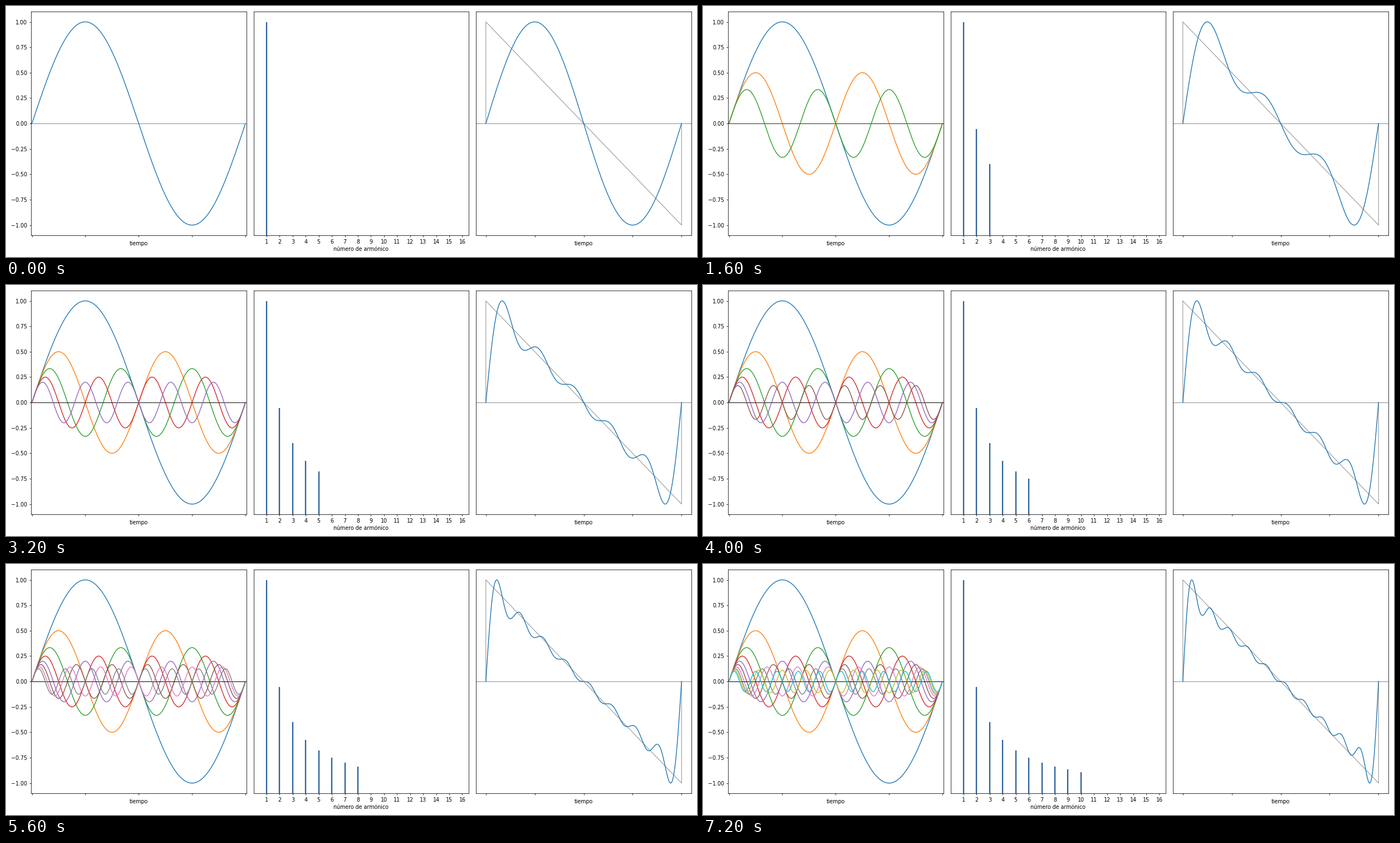
A matplotlib script that plays this animation: 1241 by 451 pixels, repeating every 8000 ms.

```python
import numpy as np
import matplotlib.pyplot as plt
from matplotlib.animation import FuncAnimation

W, H, DPI = 1241, 451, 72      # at 72 dpi one point is one pixel
STEPS, STEP_MS = 10, 800
TOP, AX_W, AX_H = 10.25, 386.6, 401.7
LEFTS = (45.0, 444.6, 844.2)
GUIDE = dict(color="black", alpha=0.45, lw=1)

plt.rcParams.update({
    "font.family": "DejaVu Sans",
    "font.size": 9.5,
    "axes.labelpad": 3.8,
    "axes.linewidth": 0.8,
    "lines.linewidth": 1.4,
    "xtick.major.size": 3.3, "xtick.major.pad": 3.3,
    "ytick.major.size": 3.3, "ytick.major.pad": 3.3,
})

fig = plt.figure(figsize=(W / DPI, H / DPI), dpi=DPI, facecolor="white")


def panel(left, xlim, ylim, xlabel):
    ax = fig.add_axes([left / W, 1 - (TOP + AX_H) / H, AX_W / W, AX_H / H])
    ax.set(xlim=xlim, ylim=ylim, xlabel=xlabel)
    return ax


def time_panel(left, margin):
    ax = panel(left, (-margin, 1 + margin), (-1.1, 1.1), "tiempo")
    ax.set_xticks(np.linspace(0, 1, 5), labels=[])
    return ax


ax_parts = time_panel(LEFTS[0], 0.004)
ax_spec = panel(LEFTS[1], (0, 16.5), (0, 1.05), "número de armónico")
ax_sum = time_panel(LEFTS[2], 0.05)

ax_parts.set_yticks(np.linspace(-1, 1, 9))
ax_spec.set_xticks(range(1, 17))
ax_spec.set_yticks([])
ax_sum.set_yticks([])

t = np.linspace(0, 1, 1001)
orders = np.arange(1, STEPS + 1)
waves = np.array([np.sin(2 * np.pi * n * t) / n for n in orders])
sums = np.cumsum(waves, axis=0)
sums /= sums.max(axis=1, keepdims=True)

# Each harmonic brings its own translucent zero line, so the axis darkens.
layers = []
for n, wave in zip(orders, waves):
    zero = ax_parts.axhline(0, **GUIDE)
    curve, = ax_parts.plot(t, wave, color=f"C{n - 1}")
    stem, = ax_spec.plot([n, n], [0, 1 / n], color="#2a6099", lw=2.3,
                         solid_capstyle="butt")
    layers.append((zero, curve, stem))

ax_sum.axhline(0, **GUIDE)
ax_sum.plot([0, 0, 1, 1], [0, 1, -1, 0], **GUIDE)
total, = ax_sum.plot(t, sums[0], color="C0")


def update(step):
    for i, layer in enumerate(layers):
        for artist in layer:
            artist.set_visible(i <= step)
    total.set_ydata(sums[step])
    return [total]


anim = FuncAnimation(fig, update, frames=STEPS, interval=STEP_MS,
                     repeat=True, repeat_delay=0, blit=False)
plt.show()
```
